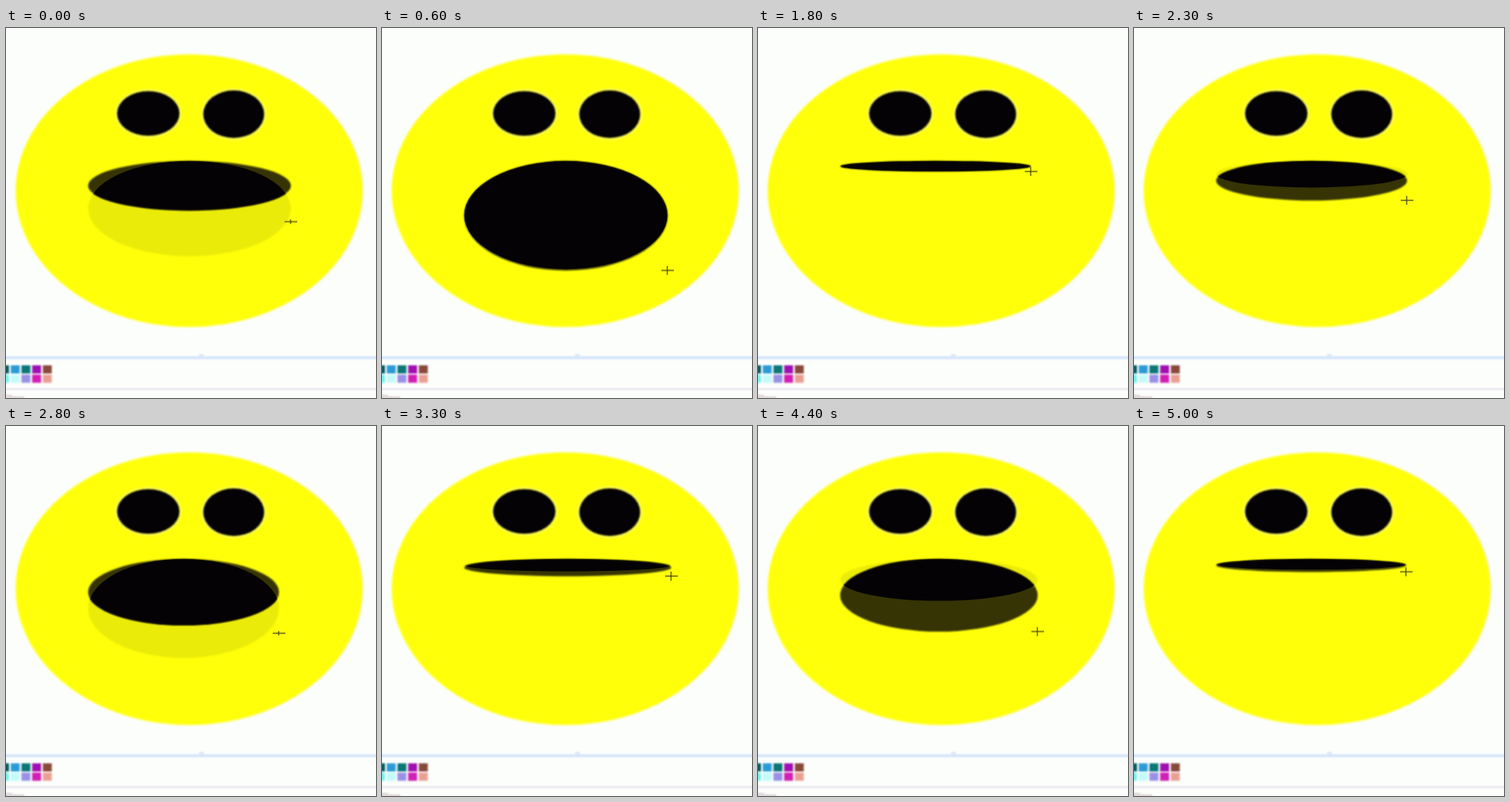
Recreate the animation shown at these times as an HTML page with a canvas. Size 498 px wide and 498 px high, loop 5100 ms.

```html
<!DOCTYPE html>
<html lang="en">
<head>
<meta charset="utf-8">
<title>Talking face</title>
<style>
  html, body { margin: 0; width: 100%; height: 100%; overflow: hidden; background: #fdfefd; }
  canvas { display: block; }
</style>
</head>
<body>
<canvas id="stage" width="498" height="498"></canvas>
<script>
const ctx = document.getElementById('stage').getContext('2d');
const STEP = 100, STEPS = 51;
const LEFT = 111, TOP = 179, SHUT = 192;
const BLACK = '#040204';

// Each bite opens slowly up to its peak step, then snaps shut
const bites = [
  { peak: -1, bottom: 306, close: 1.9, right: 383 },
  { peak: 5.4, bottom: 333, close: 4, right: 384 },
  { peak: 12, bottom: 384, close: 4.4, right: 385 },
  { peak: 27, bottom: 311, close: 2.4, right: 367 },
  { peak: 37, bottom: 268, close: 2.2, right: 389 },
  { peak: 45, bottom: 300, close: 3.5, right: 376 },
  { peak: 53, bottom: 300, close: 3, right: 366 }
];

const swatchRows = [
  ['#075c60', '#2b9bd6', '#0b7776', '#a00fb2', '#88493a'],
  ['#78f3ec', '#c4fafa', '#9a90e6', '#d21fb2', '#e9a092']
];

function mouthAt(step) {
  const next = bites.findIndex(b => b.peak > step);
  const last = bites[next - 1];
  const shutAt = last.peak + last.close;
  const closing = step < shutAt;
  const bite = closing ? last : bites[next];
  const p = closing
    ? (step - last.peak) / last.close
    : (step - shutAt) / (bite.peak - shutAt);
  const open = closing
    ? (1 + Math.cos(Math.PI * p)) / 2
    : Math.sin(Math.PI / 2 * p * p) ** 2;
  return { right: bite.right, bottom: SHUT + (bite.bottom - SHUT) * open };
}

function oval(cx, cy, rx, ry, color) {
  ctx.beginPath();
  ctx.ellipse(cx, cy, rx, ry, 0, 0, Math.PI * 2);
  if (color) {
    ctx.fillStyle = color;
    ctx.fill();
  }
}

function mouthOval({ right, bottom }, color) {
  const rx = (right - LEFT) / 2, ry = (bottom - TOP) / 2;
  oval(LEFT + rx, TOP + ry + 0.5, rx + 0.5, ry + 0.7, color);
}

function rect(x, y, w, h, color) {
  ctx.fillStyle = color;
  ctx.fillRect(x, y, w, h);
}

function soft(px, draw) {
  ctx.save();
  ctx.filter = `blur(${px}px)`;
  draw();
  ctx.restore();
}

function drawPage() {
  rect(0, 0, 498, 498, '#fcfefc');
  soft(1.8, () => oval(246.5, 219, 233.5, 183.5, '#ffff0a'));
  soft(1.2, () => {
    rect(-5, 442, 510, 3.5, '#cfe2f9');
    rect(260, 439, 6, 3, '#d3e3f8');
  });
  soft(0.9, () => {
    rect(-5, 485, 510, 2, '#e3dceb');
    swatchRows.forEach((row, r) => row.forEach((color, i) =>
      rect(14.4 * i - 8, 454 + 12.5 * r, 12, 11, color)));
    ctx.fillStyle = '#b09a9c';
    ctx.font = '10px "Liberation Sans", sans-serif';
    ctx.fillText('Plans', 0, 502);
  });
}

function drawEye(cx, cy, rx, ry) {
  soft(1.5, () => oval(cx, cy, rx + 3, ry + 3, 'rgba(245,245,150,.5)'));
  soft(1, () => oval(cx, cy, rx, ry, BLACK));
}

// The previous pose lingers faintly under the new one
function drawMouth(now, before) {
  soft(0.9, () => {
    mouthOval(before, 'rgba(0,0,0,.08)');
    mouthOval(now, 'rgba(4,2,4,.8)');
    mouthOval(before);
    ctx.clip();
    mouthOval(now, BLACK);
  });
}

function drawPointer(now, before) {
  const drop = Math.max(0, before.bottom - now.bottom);
  const x = now.right, y = now.bottom + 1 + drop / 4;
  const arm = drop > 10 ? 3 : 6;
  soft(0.7, () => {
    rect(x - 8, y - 1, 17, 2, 'rgba(70,70,20,.65)');
    rect(x - 1, y - arm, 2, arm * 2, 'rgba(70,70,20,.65)');
  });
}

let shown = -1;
const start = performance.now();

function tick() {
  const step = Math.floor((performance.now() - start) / STEP) % STEPS;
  if (step !== shown) {
    shown = step;
    const now = mouthAt(step), before = mouthAt(step - 1);
    drawPage();
    drawEye(191.5, 115, 42, 30);
    drawEye(306.5, 116, 41, 32);
    drawMouth(now, before);
    drawPointer(now, before);
  }
  requestAnimationFrame(tick);
}
tick();
</script>
</body>
</html>
```
